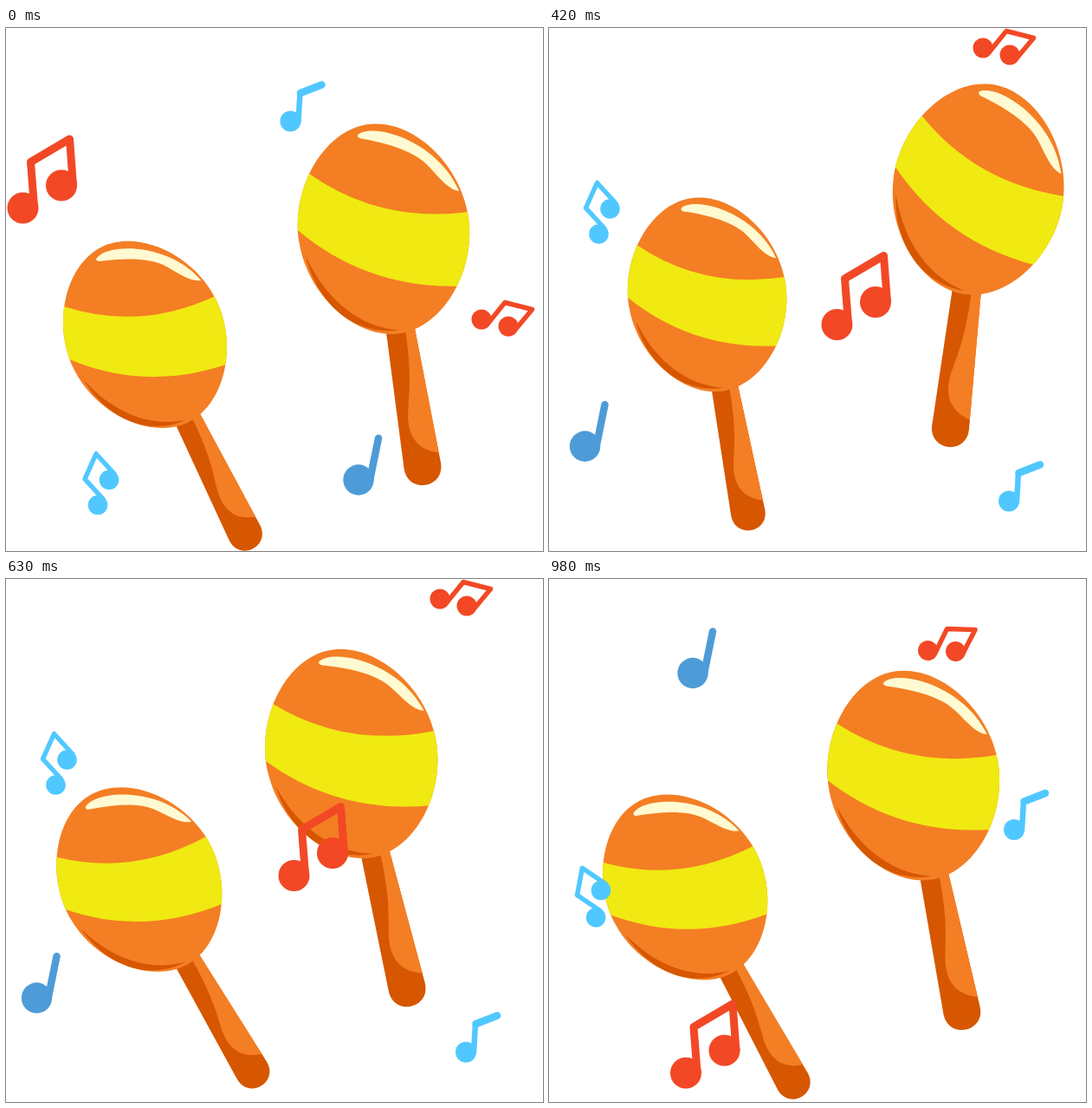
These frames come from a looping animation (620 px wide and 603 px high, 1050 ms). An HTML page with a canvas:

```html
<!DOCTYPE html>
<html lang="en">
<head>
<meta charset="utf-8">
<title>Maracas</title>
<style>
html, body { margin: 0; height: 100%; overflow: hidden; background: #fff; }
canvas { display: block; }
</style>
</head>
<body>
<canvas id="stage" width="620" height="603"></canvas>
<script>
const ctx = document.getElementById('stage').getContext('2d');
const STEP = 70, BEAT = 5, BEATS = 3;
const ORANGE = '#f47e24', DARK = '#d65700', YELLOW = '#f0e912', CREAM = '#fffad2';
const RED = '#f24825', SKY = '#50c8ff', BLUE = '#4d9cd8';

// Each maraca swings through one pose per beat: grip x, grip y, tilt in degrees
const REACH = 278;
const MARACAS = [
  { scale: 0.924, poses: [[276, 583, 26.7], [210, 557, 3.3], [301, 570, 36.6]] },
  { scale: 1, poses: [[481, 506, 9.3], [463.5, 458.5, -14], [463, 475, 19.4]] }
];
const BENDS = [0.05, 0.12, -0.2];

// Each note jumps to a new spot per beat: x, y and an optional drift
const NOTES = [
  { draw: bigPair, spots: [[19.5, 207.5, -2, -2], [332.5, 342], [158, 569.5]] },
  { draw: flagged, spots: [[328.5, 107.5], [531, 545.5], [541, 289, -4, 0]] },
  { draw: smallPair, turn: -12.7, spots: [[549, 336, -3, 5], [501, 23], [437.5, 82.5]] },
  { draw: tiltedPair, turn: -13.5, spots: [[119, 521, -3, 5], [70.5, 208.5], [60, 359]] },
  { draw: quarter, spots: [[407, 521, 1, 7], [43.5, 482, -8, 1], [166, 108.5]] }
];

const rad = deg => deg * Math.PI / 180;
const bend = (u, e) => u + e * u * (1 - u);

function fill(color, path) {
  ctx.fillStyle = color;
  ctx.fill(new Path2D(path));
}

function line(color, width, path) {
  ctx.strokeStyle = color;
  ctx.lineWidth = width;
  ctx.stroke(new Path2D(path));
}

function dot(color, x, y, r) {
  ctx.fillStyle = color;
  ctx.beginPath();
  ctx.arc(x, y, r, 0, Math.PI * 2);
  ctx.fill();
}

// Oval with slightly tightened shoulders
function oval(a, b, k) {
  const p = new Path2D(), u = a * k, v = b * k;
  p.moveTo(0, -b);
  p.bezierCurveTo(u, -b, a, -v, a, 0);
  p.bezierCurveTo(a, v, u, b, 0, b);
  p.bezierCurveTo(-u, b, -a, v, -a, 0);
  p.bezierCurveTo(-a, -v, -u, -b, 0, -b);
  return p;
}
const BODY = oval(98.8, 122, 0.515);

function maraca({ poses, scale }, beat, u) {
  const next = poses[(beat + 1) % BEATS], k = bend(u, BENDS[beat]);
  const [x, y, tilt] = poses[beat].map((v, i) => v + (next[i] - v) * k);
  ctx.save();
  ctx.translate(x, y);
  ctx.rotate(-rad(tilt));
  ctx.scale(scale, scale);
  ctx.translate(0, -REACH);

  fill(DARK, 'M-16 105 L-21.5 277 C-21.5 306.5 21.5 306.5 21.5 277 L16.5 105 Z');
  fill(ORANGE, 'M6 105 C6 165 0 185 -5 207 C-14 240 -2 258 21.1 265 L16.5 105 Z');

  ctx.fillStyle = ORANGE;
  ctx.fill(BODY);
  ctx.save();
  ctx.clip(BODY);
  fill(YELLOW, 'M-110 -108 L-75 -77 Q-4 -7 99.5 -3.7 L130 0 L110 83 L74 79 Q-31 64 -98.6 -15 L-130 -50 Z');
  ctx.restore();
  fill(DARK, 'M-94 16 C-90 72 -54 116 -2 118 C-42 108 -78 74 -94 16 Z');
  fill(CREAM, 'M-12 -112 C8 -124 78 -90 93 -29 C80 -33 72 -50 62 -64 C50 -82 22 -96 -6 -106 C-10 -107 -14 -109 -12 -112 Z');
  ctx.restore();
}

function bigPair() {
  line(RED, 9, 'M13 -2 L9 -53 L54 -79.5 L58 -26');
  dot(RED, 0, 0, 18);
  dot(RED, 44.5, -26, 18);
}

function flagged() {
  line(SKY, 6.5, 'M9 0 L11 -33');
  line(SKY, 8.5, 'M11.5 -32.5 L36 -42');
  dot(SKY, 0, 0, 12);
}

function smallPair() {
  line(RED, 5.5, 'M8 4 L27 -19.5 L58.5 -11.5 L38 13');
  dot(RED, 0, 0, 11.5);
  dot(RED, 31, 8, 11.5);
}

function tiltedPair() {
  line(SKY, 5.5, 'M6 -7 L-15 -30 L-28 -1 L-7 22');
  dot(SKY, 0, 0, 11.3);
  dot(SKY, -13, 29, 11.3);
}

function quarter() {
  line(BLUE, 8.5, 'M13 1 L23 -48');
  dot(BLUE, 0, 0, 17.7);
}

function note({ draw, spots, turn = 0 }, beat, u) {
  const [x, y, dx = 0, dy = 0] = spots[beat];
  const k = u * BEAT / (BEAT - 1);
  ctx.save();
  ctx.translate(x + dx * k, y + dy * k);
  if (beat === BEATS - 1) ctx.rotate(rad(turn));
  draw();
  ctx.restore();
}

function render(step) {
  const beat = Math.floor(step / BEAT), u = step % BEAT / BEAT;
  ctx.fillStyle = '#fff';
  ctx.fillRect(0, 0, 620, 603);
  MARACAS.forEach(m => maraca(m, beat, u));
  NOTES.forEach(n => note(n, beat, u));
}

ctx.lineCap = ctx.lineJoin = 'round';
const begin = performance.now();

function tick() {
  const t = Math.max(0, performance.now() - begin);
  render(Math.floor(t / STEP) % (BEAT * BEATS));
  requestAnimationFrame(tick);
}
tick();
</script>
</body>
</html>
```
